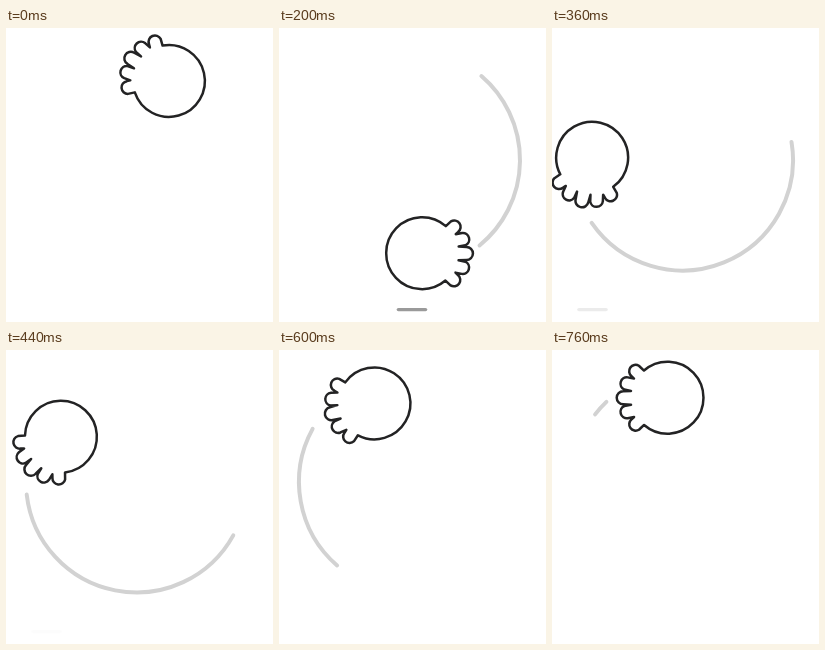
An HTML page that plays this animation: 267 px wide and 294 px high, repeating every 800 ms.

```html
<!DOCTYPE html>
<html lang="en">
<head>
<meta charset="utf-8">
<title>Rolling ball</title>
<style>
  html, body { margin: 0; width: 100%; height: 100%; overflow: hidden; background: #fff; }
  svg { display: block; width: 100%; height: 100%; }
  path, line { stroke-linecap: round; stroke-linejoin: round; }
  #trail { fill: none; stroke: #d2d2d2; stroke-width: 4; }
  #shadow { stroke: #999; stroke-width: 3.4; }
  #ball { fill: #fff; stroke: #232324; stroke-width: 2.5; }
</style>
</head>
<body>
<svg viewBox="0 0 267 294">
  <line id="shadow" x1="-13.6" x2="13.6" y1="281.6" y2="281.6"/>
  <path id="trail"/>
  <path id="ball" d="M23.5 -27.2 L28.6 -32 A6.4 6.4 0 0 1 36 -21.6 L33.5 -19.2
    L39.8 -20.4 A6.4 6.4 0 0 1 43.2 -8.2 L36.5 -6.9
    L44.3 -6.5 A6.5 6.5 0 0 1 44.3 6.5 L36.5 6.9
    L43.2 8.2 A6.4 6.4 0 0 1 39.8 20.4 L33.5 19.2
    L36 21.6 A6.4 6.4 0 0 1 28.6 32 L23.5 27.2
    A35.95 35.95 0 1 1 23.5 -27.2 Z"/>
</svg>
<script>
  const LOOP = 800, TICK = 40, TURN = 360;
  const [ball, trail, shadow] = ['ball', 'trail', 'shadow'].map(id => document.getElementById(id));

  // Same curve as CSS cubic-bezier(), solved by bisection.
  function bezier(x1, y1, x2, y2) {
    const curve = (a, b, s) => 3 * (1 - s) * s * ((1 - s) * a + s * b) + s ** 3;
    return x => {
      let lo = 0, hi = 1;
      for (let i = 0; i < 24; i++) {
        const mid = (lo + hi) / 2;
        if (curve(x1, x2, mid) < x) lo = mid; else hi = mid;
      }
      return curve(y1, y2, lo);
    };
  }

  // Moves from a to b between times t0 and t1, and holds outside them.
  function tween(a, b, t0, t1, ease) {
    return t => a + (b - a) * ease(Math.max(0, Math.min(1, (t - t0) / (t1 - t0))));
  }

  // Angles in degrees
  const orbit = tween(-68.3, 262, 0, LOOP, bezier(.234, .12, .203, .966));
  const head = tween(-90, 230, 0, LOOP, bezier(.234, .155, .203, .89));
  const tailOut = tween(-90, -10.4, 0, TURN, bezier(.3, .1, .7, .72));
  const tailIn = tween(-10.4, 232, TURN, LOOP, bezier(.3, .2, .6, .75));
  const slide = tween(225, 40.5, 0, TURN, bezier(.5, 0, .65, 1));
  const fade = t => Math.exp(-(((t - 215) / 112) ** 2));

  function polar(cx, cy, r, deg) {
    const a = deg * Math.PI / 180;
    return [cx + r * Math.cos(a), cy + r * Math.sin(a)];
  }

  function draw(t) {
    const angle = orbit(t);
    const [x, y] = polar(129.7, 136.4, 89.8, angle);
    ball.setAttribute('transform', `translate(${x} ${y}) rotate(${angle - 81})`);

    // Round caps add about one degree at each end.
    const from = (t < TURN ? tailOut(t) : tailIn(t)) + 1, to = head(t) - 1;
    const point = deg => polar(130.5, 132, 110.5, deg).join(' ');
    trail.setAttribute('d', to > from ? `M${point(from)} A110.5 110.5 0 0 1 ${point(to)}` : '');

    shadow.setAttribute('transform', `translate(${slide(t)} 0)`);
    shadow.setAttribute('opacity', t > 0 ? fade(t) : 0);
  }

  const start = performance.now();
  function loop() {
    const t = (performance.now() - start) % LOOP;
    draw(Math.floor(t / TICK) * TICK);
    requestAnimationFrame(loop);
  }
  loop();
</script>
</body>
</html>
```
